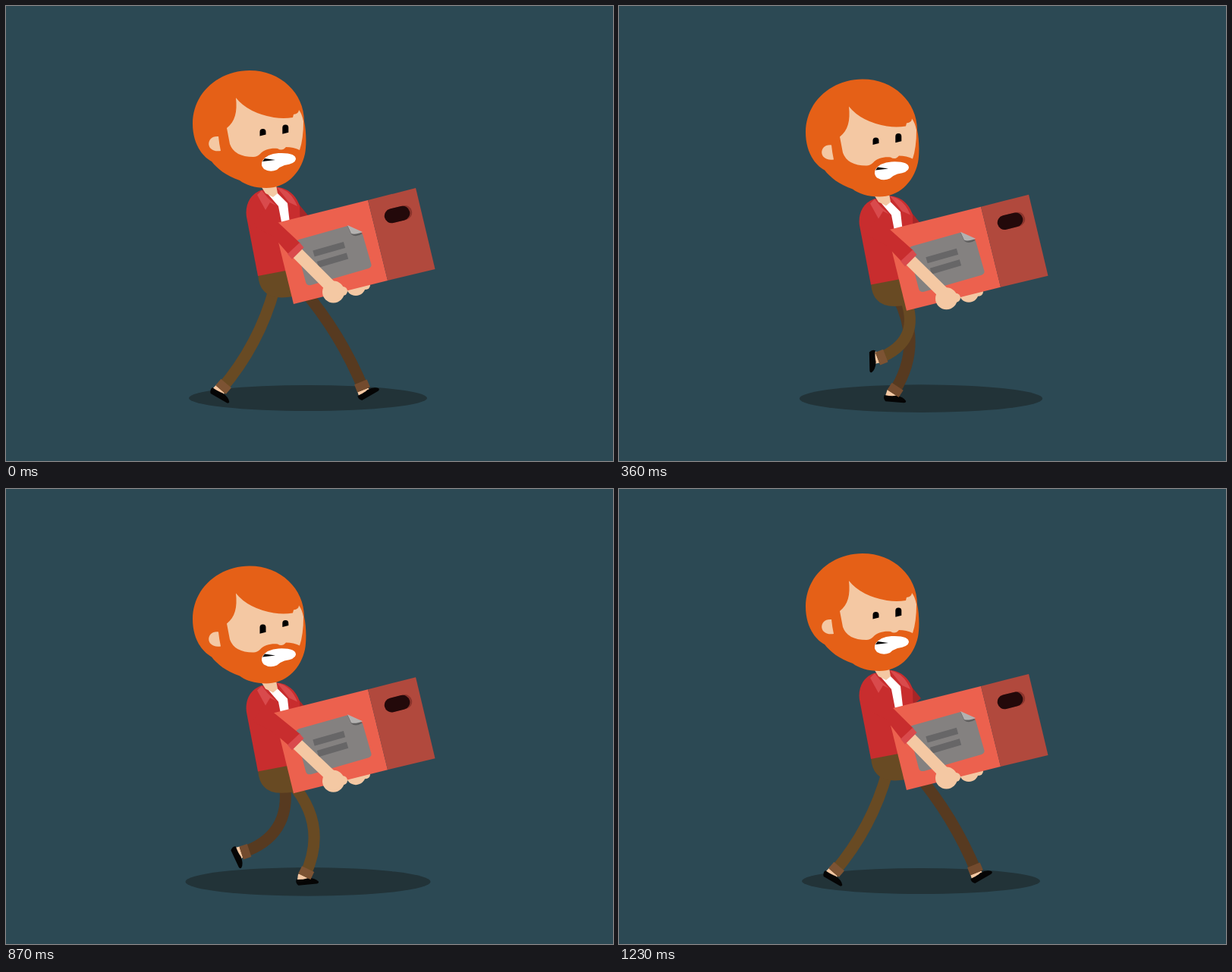
Animation of 800 by 600 pixels, one loop 1260 ms. Source, as an HTML page:

```html
<!DOCTYPE html>
<html lang="en">
<head>
<meta charset="utf-8">
<title>Carrying a box</title>
<style>
  html, body { margin: 0; height: 100%; overflow: hidden; background: #2c4954; }
  svg { display: block; width: 100vw; height: 100vh; }
  .skin { fill: #f4c8a3; }
  .hair { fill: #e56017; }
  .shirt { fill: #c82d2e; }
  .collar { fill: #d94a4c; }
  .leg, .cuff, #forearm { fill: none; stroke-width: 15; }
  .cuff { stroke-width: 18; }
  .near .leg { stroke: #684a23; }
  .near .cuff { stroke: #7c5333; }
  .far .leg { stroke: #573a20; }
  .far .cuff { stroke: #734b2e; }
  #forearm { stroke: #f4c8a3; stroke-width: 16; }
</style>
</head>
<body>
<svg viewBox="0 0 800 600">
  <defs>
    <g id="foot">
      <path class="skin" d="M-8-4H5L7 5H-10Z"/>
      <path fill="#050505" d="M-11 3Q-2 4 4 2.500Q14 3 18 8.500Q18 11 15 11H-9Q-13 7-11 3Z"/>
    </g>
  </defs>

  <ellipse id="shadow" cx="398" fill="#223338"/>
  <g class="far" id="farLeg"><use href="#foot"/><path class="leg"/><path class="cuff"/></g>
  <g class="near" id="nearLeg"><use href="#foot"/><path class="leg"/><path class="cuff"/></g>

  <g id="body">
    <path fill="#684a23" d="M332 354L374 346L379 383Q350 388 340 376Q333 369 332 354Z"/>
    <path fill="#a62628" d="M384 259L398 276L386 286Z"/>
    <path class="shirt" d="M336 243C320 249 315 264 317 278L332 356L374 348L388 300L387 264C382 248 370 240 358 239Z"/>
    <path fill="#fff" d="M346 249L357 246L371 260L375 295H365L359 264Z"/>
    <path class="collar" d="M331 249L337 243L345 253L356 263L348 259L342 269ZM357 239Q376 243 384 264L373 259Z"/>
    <path class="skin" d="M335 236H356L358 247L352 252L342 247Z"/>

    <path class="hair" d="M246 155C246 115 280 85 321 85C362 85 393 115 393 152C396 165 396 185 394 195C388 222 368 240 343 240C328 240 316 236 308 230C290 224 278 214 271 205C256 197 246 178 246 155Z"/>
    <path class="skin" d="M303 121C305 140 302 152 291 161L295 182Q301 199 326 199Q331 199 335 195C340 189 350 187 358 188Q364 192 369 186Q379 186 387 190Q392 175 392 152Q390 142 386 137Q386 142 379 143L378 147Q366 149 353 147Q319 141 303 121Z"/>
    <path class="skin" d="M280 172C263 170 262 194 283 191Q281 182 280 172Z"/>
    <path fill="#fff" d="M338 204Q344 195 359 194Q382 193 382 202Q381 208 367 210Q361 212 357 216Q348 220 340 215Q335 210 338 204Z"/>
    <path d="M338 205L341 201L355 203Z"/>
    <path id="leftEye"/><path id="rightEye"/>
  </g>

  <g id="box">
    <g class="skin"><circle cx="461" cy="369" r="13"/><circle cx="474" cy="368" r="6"/></g>
    <path fill="#ec614e" d="M353 287L477 256L503 362L379 393Z"/>
    <path fill="#b1493d" d="M477 256L540 240L565.500 347L503 362Z"/>
    <g transform="rotate(-14 515.500 275)">
      <rect x="502" y="265.500" width="33.500" height="19" rx="9.500" fill="#8b342c"/>
      <rect x="498.500" y="265.500" width="34" height="19" rx="9.500" fill="#23090a"/>
    </g>
    <path fill="#848180" d="M386 308L450 290L470 301L481.500 341Q482 344 478 346L402 368Q396 369 395 364L382 314Q381 310 386 308Z"/>
    <path fill="#5f5e5e" d="M450 290L470 300Q461 306 455 301Z"/>
    <path fill="#b3b1b0" d="M450 289L470 298Q460 302 455 300Z"/>
    <path stroke="#676667" stroke-width="8.500" d="M405.500 326.500L446 315M411 341L450 329.500"/>
  </g>

  <path id="sleeve" class="shirt"/>
  <path id="forearm"/>
  <path id="cuff" class="collar" d="M371 327L387 312L392.500 318.500L377 334Z"/>
  <g id="hand" class="skin"><circle cx="431.500" cy="377" r="14.500"/><circle cx="444" cy="376" r="6"/></g>
</svg>

<script>
const LOOP = 1260, STEP = 30;
const STRIDE = 615;              // time one foot spends on the ground, or in the air
const BACK = 283, FRONT = 471.5; // ankle x at both ends of a stride
const $ = id => document.getElementById(id);

// A single smooth rise and fall from 0 to 1 and back.
function hump(t, start, length) {
  const u = (t - start) / length;
  return u > 0 && u < 1 ? Math.sin(Math.PI * u) ** 2 : 0;
}

function shift(id, y) {
  $(id).setAttribute('transform', `translate(0 ${y})`);
}

// Ankle position and foot angle: swing forward through the air, then roll back on the ground.
function step(t, lift, delay) {
  const s = t % STRIDE / STRIDE, reach = FRONT - BACK;
  if (Math.floor(t / STRIDE) % 2) {
    return { x: FRONT - reach * s, y: 511 - 5 * (2 * s - 1) ** 4, angle: 60 * s - 30 };
  }
  const rise = lift * Math.sin(Math.PI * s ** delay);
  return { x: BACK + reach * s ** 2.2, y: 506 - rise, angle: 30 - 60 * s + 2.3 * rise };
}

// The knee bends forward, more so the closer the ankle is to the hip.
function drawLeg(id, t, bob, lift, delay) {
  const { x, y, angle } = step(t, lift, delay);
  const hipX = 372 - 18 * Math.cos(Math.PI * t / STRIDE), hipY = 372 + bob;
  const length = Math.hypot(x - hipX, y - hipY);
  const bend = Math.min(45, 10 + 0.85 * (160 - length)) / length;
  const kneeX = (hipX + x) / 2 + (y - hipY) * bend;
  const kneeY = (hipY + y) / 2 - (x - hipX) * bend;
  const hem = 11 / Math.hypot(x - kneeX, y - kneeY);
  const [foot, leg, cuff] = $(id).children;
  foot.setAttribute('transform', `translate(${x} ${y}) rotate(${angle})`);
  leg.setAttribute('d', `M${hipX} ${hipY}Q${kneeX} ${kneeY} ${x} ${y}`);
  cuff.setAttribute('d', `M${x} ${y}l${(kneeX - x) * hem} ${(kneeY - y) * hem}`);
}

function drawEye(id, x, top, height) {
  $(id).setAttribute('d', `M${x} ${top + height}V${top + 4}a4 4 0 0 1 8 0V${top + height - 2}Z`);
}

function draw(t) {
  const bob = 18 * hump(t, 0, 510) + 17 * hump(t, 600, 615);
  const heave = 9.3 * (hump(t, 0, 620) + hump(t, 650, 570) + hump(t, 1090, 620));
  const wrist = 0.7 * heave + 0.3 * bob;
  const squint = hump(t, 560, 690);

  const shadow = $('shadow');
  shadow.setAttribute('cy', 517 + bob / 18);
  shadow.setAttribute('rx', 157 + bob * 5 / 18);
  shadow.setAttribute('ry', 17 + bob / 9);

  drawLeg('farLeg', t + STRIDE, bob, 27, 1);
  drawLeg('nearLeg', t, bob, 42, 1.6);
  shift('body', bob);
  shift('box', heave);
  shift('hand', heave);
  shift('cuff', wrist);
  $('sleeve').setAttribute('d',
    `M340 ${268 + bob}L388 ${313 + wrist}L373 ${328 + wrist}L352 ${304 + bob}L325 ${290 + bob}Z`);
  $('forearm').setAttribute('d', `M383 ${325 + wrist}L429 ${371 + heave}`);
  drawEye('leftEye', 334.5, 162, 9.5 + 3 * squint);
  drawEye('rightEye', 364.3, 156.5, 12.3 - 3.3 * squint);
}

const start = performance.now();
function tick() {
  const t = (performance.now() - start) % LOOP;
  draw(Math.floor(t / STEP) * STEP);
  requestAnimationFrame(tick);
}
tick();
</script>
</body>
</html>
```
